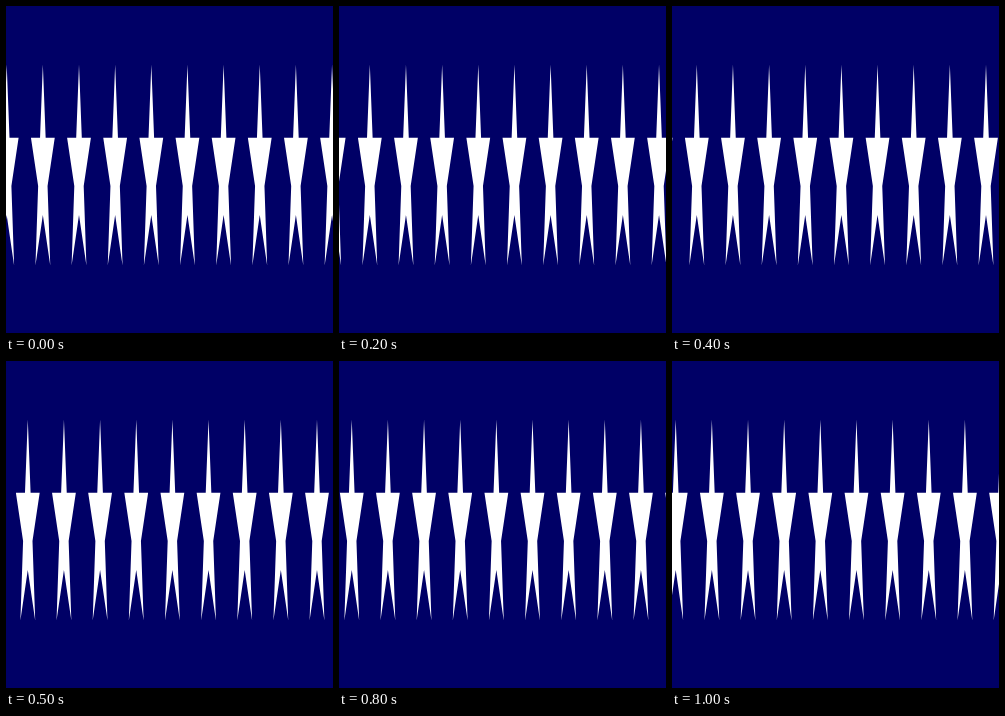
These frames come from a looping animation (327 by 327 pixels, 1100 ms). An HTML page with a canvas:

```html
<!DOCTYPE html>
<html lang="en">
<head>
<meta charset="utf-8">
<title>Passing stars</title>
<style>
  html, body { margin: 0; width: 100%; height: 100%; overflow: hidden; background: #006; }
  canvas { display: block; width: 100vw; height: 100vh; }
</style>
</head>
<body>
<canvas id="stage" width="327" height="327"></canvas>
<script>
const SIZE = 327, PITCH = 36.15, START = 0.7, STEP = PITCH / 12;
const ctx = document.getElementById('stage').getContext('2d');

// Right half of a tall five-pointed star, from tip to notch
const half = [[0, 58.5], [2.8, 131.7], [11.9, 131.7], [4.7, 180], [7.4, 259.5], [0, 209]];
const star = new Path2D();
half.forEach(([x, y]) => star.lineTo(x, y));
half.slice(1, -1).reverse().forEach(([x, y]) => star.lineTo(-x, y));
star.closePath();

function draw(now) {
  // Eleven poses per loop; the last one skips ahead by a step
  const tick = Math.floor(now / 100) % 11;
  const shift = (tick < 10 ? tick : 11) * STEP;

  ctx.fillStyle = '#006';
  ctx.fillRect(0, 0, SIZE, SIZE);
  ctx.fillStyle = '#fff';
  for (let x = START - shift; x < SIZE + PITCH; x += PITCH) {
    ctx.save();
    ctx.translate(x, 0);
    ctx.fill(star);
    ctx.restore();
  }
}

let start;
function frame(now) {
  start ??= now;
  draw(now - start);
  requestAnimationFrame(frame);
}
draw(0);
requestAnimationFrame(frame);
</script>
</body>
</html>
```
